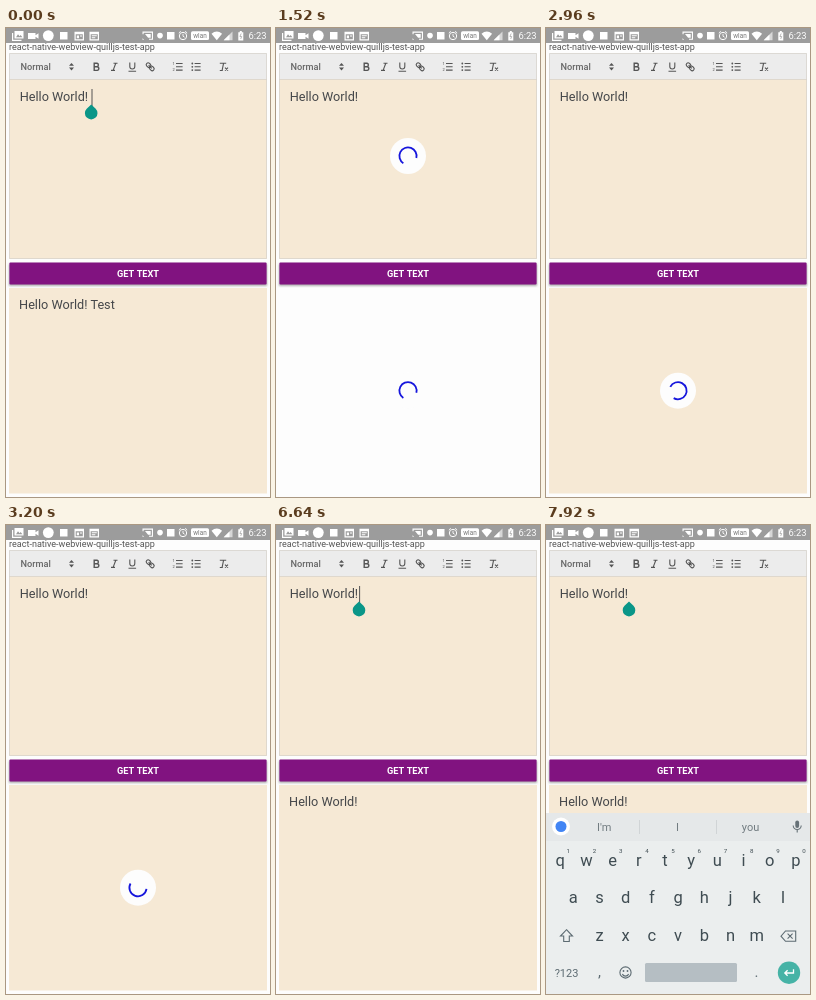
An HTML page that plays this animation: 264x469 px, repeating every 8000 ms.

```html
<!DOCTYPE html>
<html lang="en">
<head>
<meta charset="utf-8">
<title>Rich text editor demo</title>
<style>
html, body { margin: 0; width: 100%; height: 100%; overflow: hidden; background: #fdfdfd; }
svg { display: block; width: 264px; height: 469px; font-family: Roboto, sans-serif; }
.mid { text-anchor: middle; }
.line { fill: none; stroke: #555; stroke-width: 1.1; }
.body { font-size: 12.7px; fill: #45474a; }
.arc { fill: none; stroke: #1616dc; stroke-width: 1.8; }
</style>
</head>
<body>
<svg viewBox="0 0 264 469">
  <defs>
    <clipPath id="btnClip"><rect x="3.4" y="234.4" width="257.2" height="22.2" rx="1"/></clipPath>
    <filter id="shade" x="-5%" y="-30%" width="110%" height="170%"><feGaussianBlur stdDeviation="1"/></filter>
  </defs>
  <rect width="264" height="469" fill="#fdfdfd"/>

  <g id="app">
    <text x="3" y="22.3" font-size="9.05" fill="#555">react-native-webview-quilljs-test-app</text>

    <g id="editor">
      <rect x="3" y="51" width="258" height="180" fill="#f6e9d5"/>
      <rect x="3" y="25" width="258" height="26" fill="#ececec"/>
      <path d="M3.5 25.5H260.5V230.5H3.5ZM3 51.5H261" fill="none" stroke="#d6d2ca" stroke-width=".7"/>
      <g fill="#555">
        <text x="14.5" y="41.5" font-size="9.2" font-weight="500" fill="#666">Normal</text>
        <path d="M63 37.8l2.5-2.8 2.5 2.8zM63 39.6l2.5 2.8 2.5-2.8z"/>
        <text x="166.4" y="37.4" font-size="4">1</text>
        <text x="166.4" y="43" font-size="4">2</text>
        <circle cx="186.3" cy="35.5" r=".9"/><circle cx="186.3" cy="38.8" r=".9"/><circle cx="186.3" cy="42.1" r=".9"/>
      </g>
      <g class="line">
        <path d="M88.2 35.2H91a1.8 1.8 0 0 1 0 3.5H88.2ZM88.2 38.7H91.4a1.9 1.9 0 0 1 0 3.7H88.2Z" stroke-width="1.4"/>
        <path d="M107.5 35.2h4M105 42.4h4M109.8 35.2l-2.7 7.2"/>
        <path d="M123.8 34.5v4a2.5 2.5 0 0 0 5 0v-4M122.5 43.2h7.6"/>
        <g transform="rotate(45 144.2 38.8)">
          <rect x="139.4" y="36.9" width="5" height="3.8" rx="1.9"/>
          <rect x="144" y="36.9" width="5" height="3.8" rx="1.9"/>
          <path d="M142 38.8h4.4"/>
        </g>
        <path d="M170 35.5h6.6M170 38.8h6.6M170 42.1h6.6M188.6 35.5h6M188.6 38.8h6M188.6 42.1h6"/>
        <path d="M213.8 35.2h6.4M217.6 35.2l-1.5 7.2M213.8 42.5h3M219 39.6l3 3M222 39.6l-3 3"/>
      </g>
      <text class="body" x="13.7" y="73.1">Hello World!</text>
      <g id="caret">
        <rect id="bar" x="-.5" y="61" width="1" height="17" fill="#555"/>
        <path id="handle" d="M0 76.6L4.5 80.7A6.3 6.3 0 1 1-4.5 80.7Z" fill="#0a9688"/>
      </g>
    </g>

    <rect x="3" y="236" width="258" height="22" fill="#777" opacity=".6" filter="url(#shade)"/>
    <rect x="3.4" y="234.4" width="257.2" height="22.2" rx="1" fill="#811380"/>
    <circle id="ripple" cx="132" cy="245.5" fill="#fff" clip-path="url(#btnClip)"/>
    <text class="mid" x="132" y="249" font-size="9.2" font-weight="700" word-spacing=".8" fill="#fff">GET TEXT</text>

    <g id="output">
      <rect x="3" y="260" width="258" height="205.5" fill="#f6e9d5"/>
      <text class="body" id="result" x="13.1" y="281"></text>
    </g>
    <g id="spinTop" transform="translate(132 128)"><circle r="18" fill="#fdfdfd"/><path class="arc"/></g>
    <g id="spinLow" transform="translate(132 362.7)"><circle r="18" fill="#fdfdfd"/><path class="arc"/></g>
  </g>

  <g id="keys">
    <rect y="288" width="264" height="183" fill="#ebeeee"/>
    <rect y="288" width="264" height="28" fill="#e5e8e9"/>
    <circle cx="15" cy="301.5" r="9" fill="#fff"/>
    <circle cx="15" cy="301.5" r="5.5" fill="#4285f4"/>
    <path d="M93.5 295v14M170.5 295v14" stroke="#d0d4d6"/>
    <g class="mid" font-size="11" fill="#727c81">
      <text x="58.3" y="306">I'm</text><text x="131.5" y="306">I</text><text x="204.5" y="306">you</text>
    </g>
    <rect x="249.3" y="295.5" width="3.8" height="7.5" rx="1.9" fill="#667177"/>
    <path d="M247.2 300.5a4 4 0 0 0 8 0M251.2 304.5v3" fill="none" stroke="#667177" stroke-width="1.1"/>
    <g id="letters" class="mid" fill="#3f4c52"></g>
    <g fill="none" stroke="#5d6b72" stroke-width="1.1">
      <path d="M20.5 404.7l6 6.3h-3.2v5.5h-5.6V411h-3.2z"/>
      <path d="M239.5 406h10.2v10.3h-10.2l-4.5-5.1zM241.6 408.7l5 5M246.6 408.7l-5 5"/>
      <circle cx="79.5" cy="447.5" r="5.6"/>
      <path d="M76.4 449a3.3 3.3 0 0 0 6.2 0"/>
    </g>
    <g fill="#5d6b72">
      <circle cx="77.5" cy="446" r=".9"/><circle cx="81.5" cy="446" r=".9"/>
      <text class="mid" x="20.5" y="451.7" font-size="11">?123</text>
      <text class="mid" x="53.5" y="452" font-size="15">,</text>
      <text class="mid" x="210.5" y="452" font-size="15">.</text>
    </g>
    <rect x="99" y="438" width="92" height="19" rx="1.5" fill="#b5bec3"/>
    <circle cx="243" cy="447.7" r="11.2" fill="#46b3a6"/>
    <path d="M247.5 444.3v3.7h-8.5M241.6 445.2l-2.8 2.8 2.8 2.8" fill="none" stroke="#fff" stroke-width="1.3"/>
  </g>

  <g id="status">
    <rect width="264" height="15" fill="#9c9c9c"/>
    <g fill="#fff">
      <path d="M8.5 3h9v7.5h-9zM6 5h1.2v6.8h8.3V13H6z"/>
      <path d="M10 9.3l2-3 1.6 1.9 1-1.2 1.8 2.3z" fill="#9c9c9c"/>
      <path d="M22 5h7.5v2.2l3-2v5.6l-3-2V11H22z"/>
      <circle cx="42.3" cy="7.6" r="5.4"/>
      <rect x="54" y="4" width="7.5" height="7.5"/>
      <path d="M68.5 3.8h9.5v8.7h-9.5zM69.7 6.2v5h7.1v-5z" fill-rule="evenodd"/>
      <path d="M70.8 7.4h2.2v2.8h-2.2zM74 7.4h2v1h-2z"/>
      <path d="M83.5 3.8H93v8.7h-9.5zM84.7 6.2v5h7.1v-5z" fill-rule="evenodd"/>
      <path d="M85.8 7.2h5v1h-5zM85.8 9.2h3.5v1h-3.5z"/>
      <path d="M136.5 3.6h10.5v8.2h-4v-1.1h2.9v-6h-8.3v1.5h-1.1zM139 5.9h5.7v3.8h-2.6zM136.5 10.2l1.7 1.6h-1.7z"/>
      <circle cx="154" cy="7.6" r="2.8"/>
      <rect x="161" y="4" width="7.5" height="7.5"/>
      <rect x="185" y="3.2" width="18" height="8.8" rx="1.5"/>
      <path d="M205.5 5.8q5.3-4.4 10.6 0L210.8 12.3z"/>
      <path d="M226.5 3.5v8.8h-8.8z" opacity=".6"/>
      <path d="M223.5 6.5v5.8h-5.8z"/>
      <path d="M232.3 4.2h1.5V3h2v1.2h1.5v8.3h-5z"/>
      <text x="242.4" y="11.4" font-size="9.4">6:23</text>
    </g>
    <text class="mid" x="194" y="9.7" font-size="6.4" fill="#777">wlan</text>
    <path d="M235.2 5.5l-1.3 3h1.8l-1 2.5" fill="none" stroke="#9c9c9c" stroke-width=".7"/>
    <g fill="none" stroke="#fff">
      <circle cx="177" cy="8" r="3.7"/>
      <path d="M177 5.8v2.4l1.6 1M172.8 5l2-1.8M181.2 5l-2-1.8" stroke-width=".9"/>
    </g>
  </g>
</svg>

<script>
const $ = id => document.getElementById(id);
const LOOP = 8000;
const within = (t, a, b) => t >= a && t < b;
const clamp = v => Math.max(0, Math.min(1, v));
const smooth = v => { v = clamp(v); return v * v * (3 - 2 * v); };
const show = (id, on) => $(id).setAttribute("display", on ? "inline" : "none");

function addLetters() {
  const put = (s, x, y, size) =>
    `<text x="${x}" y="${y}" font-size="${size}">${s}</text>`;
  const row = (chars, x, y, size = 16.5) =>
    [...chars].map((c, i) => put(c, x + i * 26.2, y, size)).join("");
  $("letters").innerHTML = row("qwertyuiop", 14.2, 340.7) + row("asdfghjkl", 27.3, 378.2) +
    row("zxcvbnm", 53.5, 416) + row("1234567890", 22.3, 327.5, 6.2);
}

// Growing, then shrinking arc on a steadily turning ring
function arcPath(t) {
  const u = 0.83 + (t - 2080) / 1333;
  const turn = Math.floor(u), p = u - turn;
  const base = 270 * turn + 494 * (u - 0.83) - 30;
  const from = base + 270 * smooth(p * 2 - 1);
  const to = base + 270 * smooth(p * 2) + 4;
  const at = deg => {
    const a = deg * Math.PI / 180;
    return `${(8.6 * Math.cos(a)).toFixed(2)} ${(8.6 * Math.sin(a)).toFixed(2)}`;
  };
  return `M${at(from)}A8.6 8.6 0 ${to - from > 180 ? 1 : 0} 1 ${at(to)}`;
}

function spin(id, t, start, end) {
  const on = within(t, start, end);
  show(id, on);
  if (on) $(id).lastElementChild.setAttribute("d", arcPath(t));
}

function draw(t) {
  const first = t < 320;
  show("app", first || t >= 880);
  show("editor", first || t >= 1440);
  show("output", first || t >= 2640);
  $("result").textContent = first ? "Hello World! Test" : t >= 5440 ? "Hello World!" : "";
  spin("spinTop", t, 880, 2000);
  spin("spinLow", t, 880, 3280);

  show("caret", first || t >= 6560);
  show("bar", t < 80 || within(t, 6560, 7120) || within(t, 7680, 7920));
  $("bar").setAttribute("transform", `translate(${first ? 86 : 83.6} 0)`);
  $("handle").setAttribute("transform", `translate(${first ? 85.2 : 83} 0)`);

  const press = (t - 5200) / 560;
  show("ripple", within(press, 0, 1));
  $("ripple").setAttribute("r", 10 + 130 * smooth(press * 1.4));
  $("ripple").setAttribute("opacity", 0.2 * (1 - smooth(press * 2 - 1)));

  const rise = clamp((t - 6680) / 280);
  show("keys", rise > 0);
  $("keys").setAttribute("transform", `translate(0 ${182 * (1 - rise) ** 2})`);
}

addLetters();
const begin = performance.now();
function tick() {
  draw((performance.now() - begin) % LOOP);
  requestAnimationFrame(tick);
}
tick();
</script>
</body>
</html>
```
